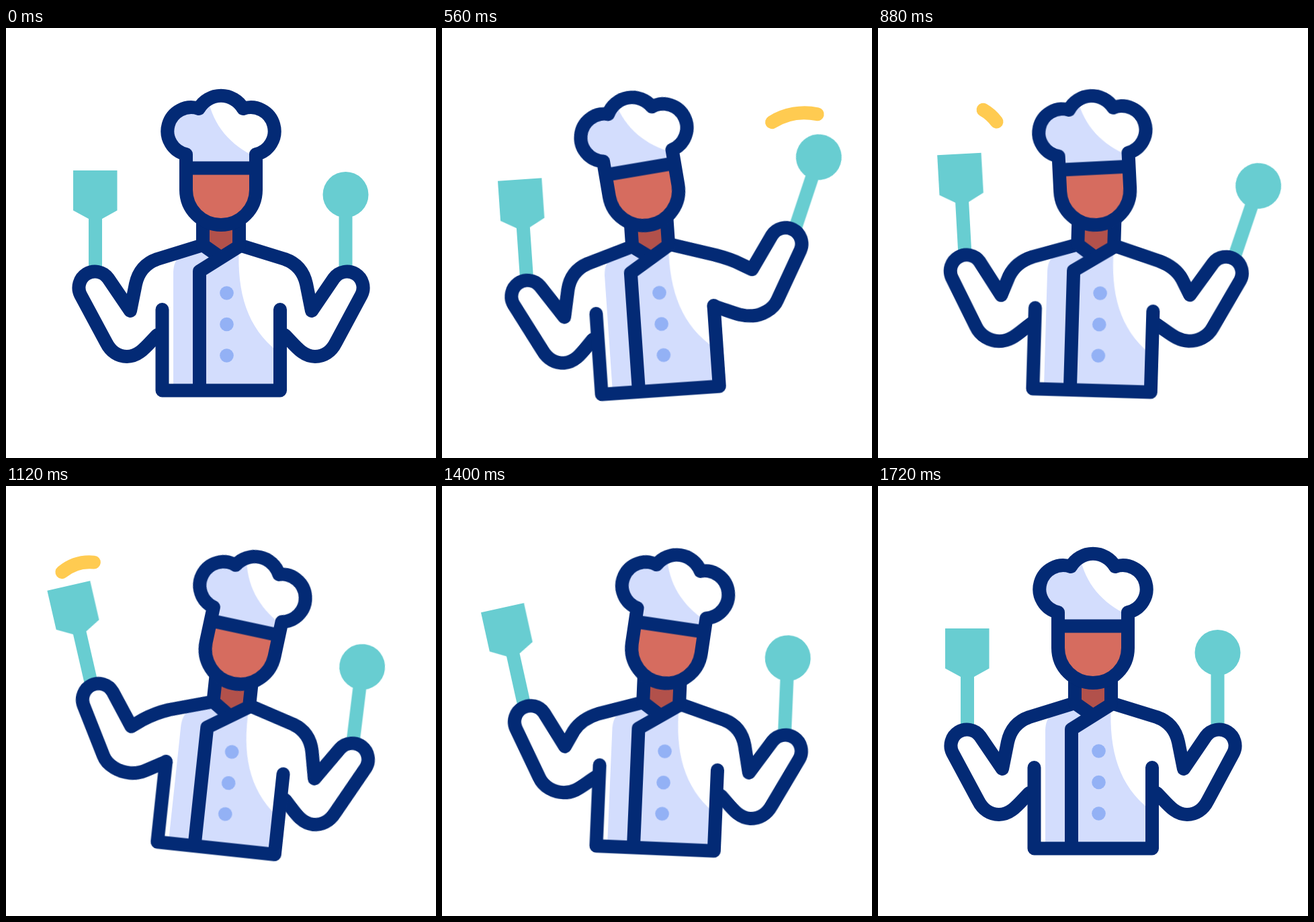
These frames come from a looping animation (640x640 px, 1800 ms). An HTML page without scripts:

```html
<!DOCTYPE html>
<html lang="en">
<head>
<meta charset="utf-8">
<title>Cheering chef</title>
<style>
  @property --head { syntax: "<length>"; inherits: false; initial-value: 0px; }
  @property --tail { syntax: "<length>"; inherits: false; initial-value: 0px; }

  html, body { margin: 0; height: 100%; overflow: hidden; background: #fff; }
  svg { display: block; width: 100vw; height: 100vh; }

  .line { fill: none; stroke: #032a75; stroke-width: 20; stroke-linecap: round; stroke-linejoin: round; }
  .collar { stroke-linecap: butt; }
  .shade { fill: #d3ddfd; }
  .button { fill: #93b1f5; }
  .tool { fill: #68cdd1; }
  .skin { fill: #d66c5f; }
  .neck { fill: #b2514b; }

  .body, .head, .hand, .grip, .arm, .swish {
    animation: 1.8s cubic-bezier(.37, 0, .63, 1) infinite;
  }

  /* Torso leans first, the head follows */
  .body { transform-origin: 320px 467px; animation-name: lean; }
  .head { transform-origin: 320px 285px; animation-name: nod; }
  @keyframes lean {
    0%, 6.67%, 90%, 100% { transform: rotate(0deg); }
    33.33% { transform: rotate(-4deg); }
    62.22% { transform: rotate(6.1deg); }
  }
  @keyframes nod {
    0%, 15.56%, 95.56%, 100% { transform: rotate(0deg); }
    40% { transform: rotate(-8deg); }
    68.89% { transform: rotate(8deg); }
  }

  /* Arms: the forearm is lifted while the shoulder straightens */
  .arm {
    --rest: path("M347 323L415 344C432 350 443 363 447 381L455 421L488.3 372.2A24 24 0 0 1 529 397.3L491 468C484 482 473 489 460 489C441 489 430 472 415 457");
    d: var(--rest);
  }
  .right .arm { animation-name: raise-right; }
  .left .arm { animation-name: raise-left; }
  @keyframes raise-right {
    0%, 11.11%, 62.22%, 100% { d: var(--rest); }
    35.56% {
      d: path("M347 323L415 344C430 349 443 354 452 358L469.5 365L502.8 316.2A24 24 0 0 1 543.5 341.3L504 413C497 427 478 434 465 434C447 434 435 427 408 417");
    }
  }
  @keyframes raise-left {
    0%, 37.22%, 93.33%, 100% { d: var(--rest); }
    64.44% {
      d: path("M347 323L411 342C428 348 440 355 449 361L464.5 372L497.8 323.2A24 24 0 0 1 538.5 348.3L501 420C494 434 475 441 459 441C441 441 431 431 407.5 419");
    }
  }

  /* Tools ride on the hands and swing outwards */
  .right .hand { animation-name: lift-right; }
  .left .hand { animation-name: lift-left; }
  .right .grip { transform-origin: 505px 408px; animation-name: swing-right; }
  .left .grip { transform-origin: 507px 404px; animation-name: swing-left; }
  @keyframes lift-right {
    0%, 11.11%, 62.22%, 100% { transform: translate(0px, 0px); }
    35.56% { transform: translate(14px, -55px); }
  }
  @keyframes lift-left {
    0%, 37.22%, 93.33%, 100% { transform: translate(0px, 0px); }
    64.44% { transform: translate(9.5px, -49px); }
  }
  @keyframes swing-right {
    0%, 11.11%, 65.56%, 100% { transform: rotate(0deg); }
    37.78% { transform: rotate(26deg); }
  }
  @keyframes swing-left {
    0%, 40%, 95.56%, 100% { transform: rotate(0deg); }
    67.78% { transform: rotate(21deg); }
  }

  /* Swishes: head and tail run along the arc one after the other */
  .swish {
    fill: none; stroke: #ffcb51; stroke-width: 20; stroke-linecap: round; visibility: hidden;
    stroke-dasharray: calc(var(--head) - var(--tail)) 999px;
    stroke-dashoffset: calc(var(--tail) * -1);
  }
  .swish.first { animation-name: head-first, tail-first, show-first; }
  .swish.second { animation-name: head-second, tail-second, show-second; }
  @keyframes head-first { 0%, 13.33% { --head: 0px; } 35.56%, 100% { --head: 107px; } }
  @keyframes tail-first { 0%, 24.44% { --tail: 0px; } 44.44%, 100% { --tail: 107px; } }
  @keyframes show-first {
    0%, 13.4%, 44.4%, 100% { visibility: hidden; }
    13.41%, 44.39% { visibility: visible; }
  }
  @keyframes head-second { 0%, 41.11% { --head: 0px; } 64.44%, 100% { --head: 107px; } }
  @keyframes tail-second { 0%, 51.11% { --tail: 0px; } 73.33%, 100% { --tail: 107px; } }
  @keyframes show-second {
    0%, 41.2%, 73.3%, 100% { visibility: hidden; }
    41.21%, 73.29% { visibility: visible; }
  }
</style>
</head>
<body>
<svg viewBox="0 0 640 640">
  <g class="body">
    <path class="shade" d="M249 539V368C249 350 253 342 266 337L293 328L318 342L288 362V539Z"/>
    <path class="shade" d="M288 539V362L347 325C343 395 360 447 404 481V539Z"/>
    <circle class="button" cx="328.5" cy="394.5" r="10.3"/>
    <circle class="button" cx="328.5" cy="441" r="10.3"/>
    <circle class="button" cx="328.5" cy="487.5" r="10.3"/>

    <g class="right">
      <g class="hand"><g class="grip tool">
        <circle cx="505.5" cy="248" r="34"/>
        <rect x="495.5" y="270" width="20" height="99"/>
      </g></g>
      <path class="line arm"/>
    </g>
    <g class="left" transform="matrix(-1 0 0 1 640 0)">
      <g class="hand"><g class="grip tool">
        <path d="M474.5 212H540V271.5L517 284V369H497V284L474.5 271.5Z"/>
      </g></g>
      <path class="line arm"/>
    </g>

    <path class="neck" d="M293 270H347V323L320 342L293 323Z"/>
    <path class="line collar" d="M293 286V323L320 342M347 286V324"/>
    <path class="line" d="M347 325L288 362V539M232.5 419V539.5H408V419"/>

    <g class="head">
      <path class="skin" d="M268 208H372V241A52 52 0 0 1 268 241Z"/>
      <path fill="#fff" d="M268 208V188A35.35 35.35 0 1 1 287 120A38 38 0 0 1 353 120A35.35 35.35 0 1 1 372 188V208Z"/>
      <path class="shade" d="M268 208V188A35.35 35.35 0 1 1 287 120L301 106C308 144 334 175 372 192V208Z"/>
      <path class="line" d="M268 208V188A35.35 35.35 0 1 1 287 120A38 38 0 0 1 353 120A35.35 35.35 0 1 1 372 188V241A52 52 0 0 1 268 241V208.5H372"/>
    </g>
  </g>

  <path class="swish first" d="M470.5 157.5A92 92 0 0 1 568.5 131"/>
  <path class="swish second" d="M176.5 139.5A64.5 64.5 0 0 0 83 128.500"/>
</svg>
</body>
</html>
```
